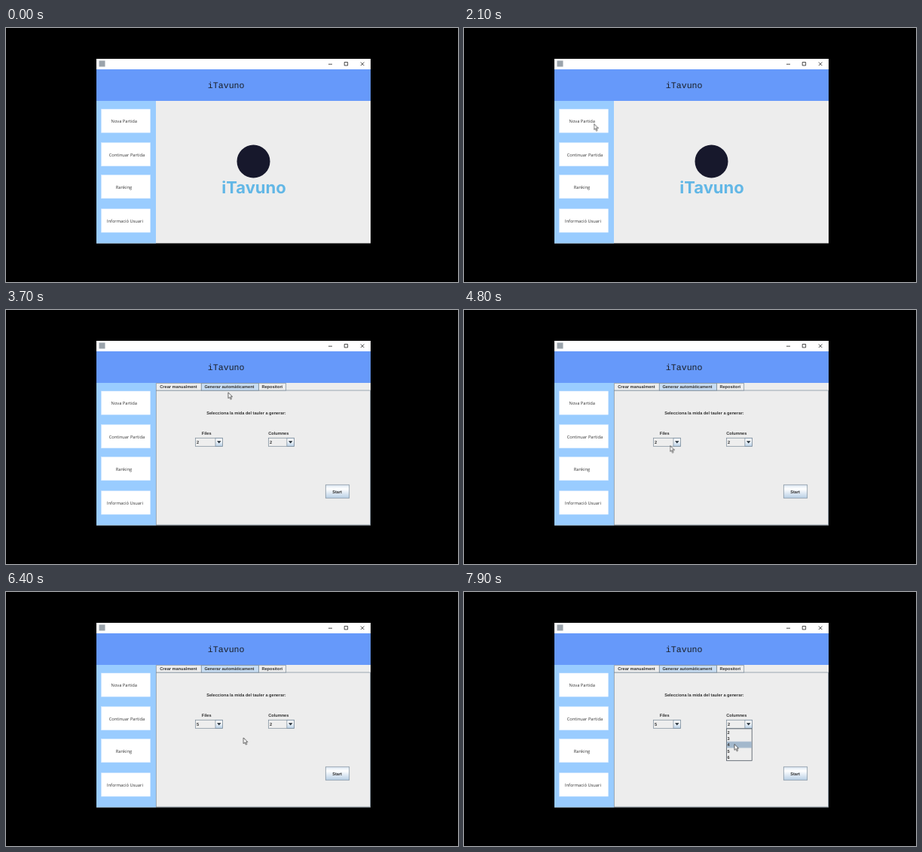
Recreate the animation shown at these times as an HTML page. Size 600 px wide and 338 px high, loop 8000 ms.

```html
<!DOCTYPE html>
<html lang="ca">
<head>
<meta charset="utf-8">
<title>iTavuno</title>
<style>
html, body { margin: 0; width: 100%; height: 100%; overflow: hidden; background: #000; }
svg { display: block; width: 600px; height: 338px; }
text { fill: #333; text-rendering: geometricPrecision; white-space: pre; }

.title { font: 11.6px "Liberation Mono", monospace; fill: #1c222c; }
.brand { font: 700 22px Inter, sans-serif; fill: #62b7e6; text-anchor: middle; }
.menu text { font: 5.75px "Open Sans", sans-serif; }
.menu rect { fill: #fff; stroke: #d9ecff; stroke-width: .5; }
.plain { font: 6px "Liberation Sans", Arial, sans-serif; }
.bold { font: 700 5.62px "Liberation Sans", Arial, sans-serif; }
.line { fill: none; stroke: #7a8a99; stroke-width: .7; }
.tab { fill: #eee; stroke: #7a8a99; stroke-width: .7; }
.lit { fill: #c8ddf2; }
.field { fill: #fff; stroke: #7a8a99; stroke-width: .7; }
.button { fill: url(#metal); stroke: #7a8a99; stroke-width: .7; }
.box { fill: #eee; stroke: #7a8a99; stroke-width: .7; }
.list { fill: #eee; stroke: #4c5560; stroke-width: .8; }
.bar { fill: #a3b8cc; }
.arrow { fill: #26303a; }

/* Hard scene changes */
.home, .tabs, .manual, .auto, .two, .five, .rowsList, .colsList, .bar {
  animation: 8s step-end infinite;
}
.home { animation-name: home; }
.tabs { animation-name: tabs; }
.manual { animation-name: manual; }
.auto { animation-name: auto; }
.two { animation-name: two; }
.five { animation-name: five; }
.rowsList { animation-name: rowsList; }
.colsList { animation-name: colsList; }
.rowsList .bar { animation-name: rowsBar; }
.colsList .bar { animation-name: colsBar; }
@keyframes home { 0% { opacity: 1 } 30%, 100% { opacity: 0 } }
@keyframes tabs { 0% { opacity: 0 } 30%, 100% { opacity: 1 } }
@keyframes manual { 0% { opacity: 0 } 30% { opacity: 1 } 41.25%, 100% { opacity: 0 } }
@keyframes auto { 0% { opacity: 0 } 41.25%, 100% { opacity: 1 } }
@keyframes two { 0% { opacity: 1 } 75%, 100% { opacity: 0 } }
@keyframes five { 0% { opacity: 0 } 75%, 100% { opacity: 1 } }
@keyframes rowsList { 0% { opacity: 0 } 63.75% { opacity: 1 } 75%, 100% { opacity: 0 } }
@keyframes colsList { 0% { opacity: 0 } 86.25%, 100% { opacity: 1 } }
@keyframes rowsBar {
  0% { transform: none }
  67.5% { transform: translateY(8.4px) }
  68.75% { transform: translateY(16.8px) }
  70%, 100% { transform: translateY(25.2px) }
}
@keyframes colsBar {
  0% { transform: none }
  93.75% { transform: translateY(8.4px) }
  96.25%, 100% { transform: translateY(16.8px) }
}

.cursor {
  fill: #fff; stroke: #222; stroke-width: .7; stroke-linejoin: round;
  animation: move 8s ease-in-out infinite, show 8s step-end infinite;
}
@keyframes show { 0% { opacity: 0 } 1.25%, 100% { opacity: 1 } }
@keyframes move {
  0%, 1.25% { transform: translate(486px, 320px); animation-timing-function: linear }
  11.25% { transform: translate(405px, 245px); animation-timing-function: ease-out }
  22.5% { transform: translate(177px, 130px) }
  26.25%, 31.25% { transform: translate(172.5px, 127.5px) }
  36.25%, 37.5% { transform: translate(298px, 106.5px) }
  40%, 43.75% { transform: translate(297px, 103.5px) }
  56.25% { transform: translate(272px, 178px) }
  60%, 61.25% { transform: translate(273.5px, 180.5px) }
  63.75%, 65% { transform: translate(280px, 177px) }
  71.25%, 75% { transform: translate(269px, 212px) }
  85%, 91.25% { transform: translate(361px, 176px) }
  98.75%, 100% { transform: translate(359px, 202.5px) }
}
</style>
</head>
<body>
<svg viewBox="0 0 600 338">
  <defs>
    <linearGradient id="metal" x2="0" y2="1">
      <stop stop-color="#dde8f3"/>
      <stop offset=".3" stop-color="#fff"/>
      <stop offset="1" stop-color="#b8cfe5"/>
    </linearGradient>
    <g id="items" class="bold">
      <text y="6.5">2</text>
      <text y="14.9">3</text>
      <text y="23.3">4</text>
      <text y="31.7">5</text>
      <text y="40.1">6</text>
    </g>
    <g id="drop">
      <rect class="button" width="9.5" height="11"/>
      <path class="arrow" d="M2 4h5.6L4.8 7.2Z"/>
    </g>
  </defs>

  <rect width="600" height="338"/>
  <rect x="120" y="41" width="364" height="245.5" fill="#ededed"/>
  <rect x="120" y="41" width="364" height="14" fill="#fff"/>
  <rect x="123.5" y="43.5" width="8" height="8" fill="#9aa3ab"/>
  <path d="M428 48.2h5M449.2 45.5h4.4v4.4h-4.4zM470.8 45.5l4.6 4.6m0-4.6l-4.6 4.6"
        fill="none" stroke="#222" stroke-width=".8"/>
  <rect x="120" y="55" width="364" height="42" fill="#6699fa"/>
  <rect x="120" y="97" width="79" height="189.5" fill="#99ccff"/>
  <text class="title" x="267.8" y="80">iTavuno</text>

  <g class="menu">
    <rect x="126.5" y="108" width="65" height="31.2"/>
    <rect x="126.5" y="152.6" width="65" height="31.2"/>
    <rect x="126.5" y="195.6" width="65" height="31.2"/>
    <rect x="126.5" y="240.8" width="65" height="31.2"/>
    <text x="139.6" y="125.7">Nova Partida</text>
    <text x="136.7" y="170.6">Continuar Partida</text>
    <text x="145.7" y="213.9">Ranking</text>
    <text x="133.8" y="258.8">Informació Usuari</text>
  </g>

  <g class="home">
    <circle cx="328.5" cy="177.5" r="22" fill="#17182c"/>
    <text class="brand" x="329" y="219.7">iTavuno</text>
  </g>

  <g class="tabs">
    <rect class="line" x="199.3" y="107" width="284.2" height="179"/>
    <rect class="tab" x="199.3" y="97.7" width="60" height="9.3"/>
    <rect class="tab" x="259.3" y="97.7" width="76" height="9.3"/>
    <rect class="tab" x="335.3" y="97.7" width="36.4" height="9.3"/>
    <rect class="tab lit manual" x="199.3" y="97.7" width="60" height="9.3"/>
    <rect class="tab lit auto" x="259.3" y="97.7" width="76" height="9.3"/>
    <g class="bold">
      <text x="204.3" y="104.2">Crear manualment</text>
      <text x="263.4" y="104.2">Generar automàticament</text>
      <text x="339.4" y="104.2">Repositori</text>
    </g>
  </g>

  <g class="manual">
    <g class="plain">
      <text x="261.8" y="142">Selecciona la mida del tauler que vols crear:</text>
      <text x="251.5" y="177.2">Files:</text>
      <text x="251.5" y="210.2">Columnes:</text>
    </g>
    <rect class="field" x="335.5" y="170.5" width="44.5" height="8.7"/>
    <rect class="field" x="335.5" y="203.4" width="44.5" height="8.7"/>
    <rect class="button" x="413.3" y="229.8" width="35.4" height="18"/>
    <text class="bold" x="423.4" y="240.8">Crear</text>
  </g>

  <g class="auto">
    <g class="bold">
      <text x="266.2" y="138.6">Selecciona la mida del tauler a generar:</text>
      <text x="259.8" y="165.7">Files</text>
      <text x="348.2" y="165.7">Columnes</text>
    </g>
    <rect class="box" x="251.5" y="170.3" width="36" height="11"/>
    <use href="#drop" x="278" y="170.3"/>
    <rect class="box" x="348.4" y="170.3" width="34" height="11"/>
    <use href="#drop" x="372.9" y="170.3"/>
    <g class="bold">
      <text class="two" x="253" y="178">2</text>
      <text class="five" x="253" y="178">5</text>
      <text x="350" y="178">2</text>
    </g>
    <rect class="button" x="424.3" y="232.8" width="31.4" height="17.4"/>
    <text class="bold" x="433.2" y="243.6">Start</text>

    <g class="rowsList">
      <rect class="list" x="251.5" y="181.9" width="35.6" height="42.4"/>
      <rect class="bar" x="251.9" y="182.2" width="34.8" height="8.4"/>
      <use href="#items" x="252.6" y="182"/>
    </g>
    <g class="colsList">
      <rect class="list" x="348.4" y="181.9" width="33.8" height="42.4"/>
      <rect class="bar" x="348.8" y="182.2" width="33" height="8.4"/>
      <use href="#items" x="349.4" y="182"/>
    </g>
  </g>

  <path class="cursor" d="M0 0V7.8L1.8 6.2L3.1 9.2L4.5 8.6L3.2 5.7H5.6Z"/>
</svg>
</body>
</html>
```
